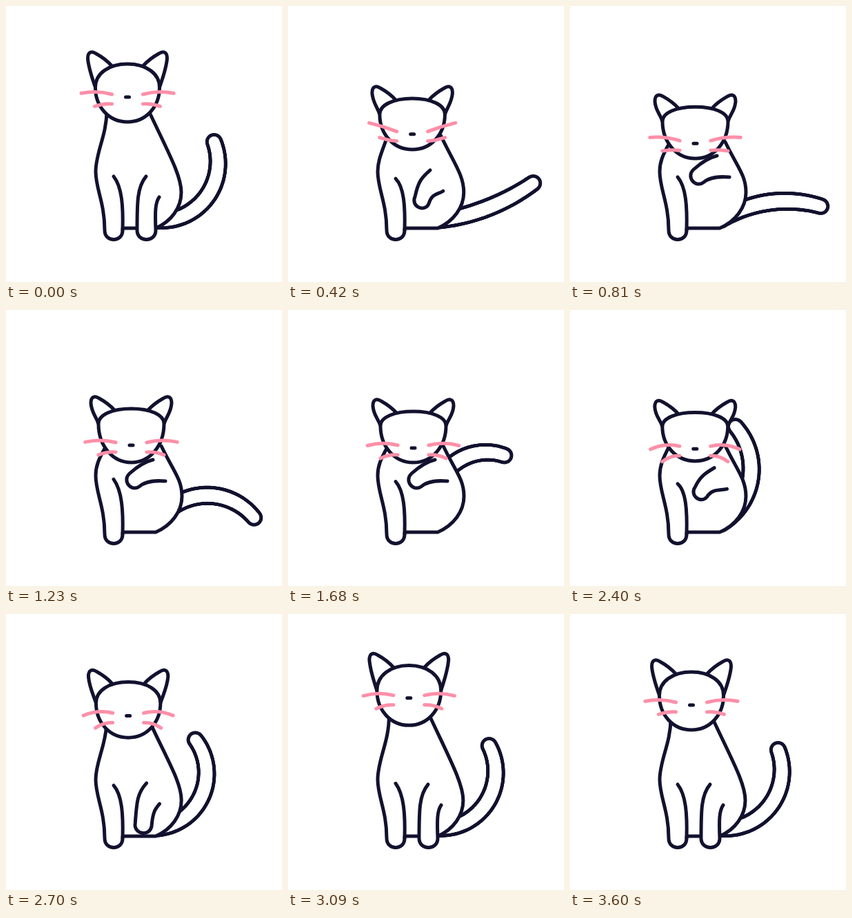
An HTML page with a canvas for the animation above (9630 ms loop, 400 px wide and 400 px high).

```html
<!DOCTYPE html>
<html lang="en">
<head>
<meta charset="utf-8">
<title>Cat washing its paw</title>
<style>
html, body { margin: 0; width: 100%; height: 100%; overflow: hidden; background: #fff; }
canvas { display: block; }
</style>
</head>
<body>
<canvas id="stage" width="400" height="400"></canvas>
<script>
const LOOP = 9630, STEP = 30;
const INK = '#12122f', PINK = '#ff8fa8', WHITE = '#fff';
const ctx = document.getElementById('stage').getContext('2d');
ctx.lineCap = ctx.lineJoin = 'round';

// The whole pose follows from these channels, keyed as [ms, value].
const channels = {
  crouch: [[0, 0], [420, 0.755], [700, 1], [1680, 1], [2400, 0.96], [2700, 0.21], [2970, -0.14], [3600, 0]],
  nod: [[0, 0], [420, 4], [1230, -2], [1680, 2], [2400, 6], [2970, -2], [3600, 0]],
  droop: [[0, 0], [420, -11], [1000, 0], [1680, 2], [2400, 6], [3600, 0]],
  lift: [[0, 0], [420, 0.55], [800, 1], [2000, 1], [2400, 0.78], [2700, 0.25], [3000, 0]],
  tailAngle: [[0, -53.5], [420, -21.4], [1100, -4], [1230, -4], [1680, -46], [2400, -81], [2700, -66], [3600, -53.5]],
  tailTurn: [[0, -115], [420, -28], [1230, 110], [1680, 132], [2400, -100], [2700, -122], [3600, -115]]
};

// Smooth interpolation that never overshoots a key.
function sample(keys, t) {
  const last = keys.length - 1;
  if (t >= keys[last][0]) return keys[last][1];
  const i = keys.findIndex((key, n) => t < keys[n + 1][0]);
  const slope = n => (keys[n + 1][1] - keys[n][1]) / (keys[n + 1][0] - keys[n][0]);
  const tangent = n => {
    if (n === 0 || n === last) return 0;
    const a = slope(n - 1), b = slope(n);
    return a * b > 0 ? 2 * a * b / (a + b) : 0;
  };
  const [[t0, a], [t1, b]] = keys.slice(i, i + 2);
  const span = t1 - t0, u = (t - t0) / span, v = 1 - u;
  return a * v * v * (1 + 2 * u) + b * u * u * (3 - 2 * u) +
    span * u * v * (v * tangent(i) - u * tangent(i + 1));
}

function curve(p) {
  ctx.beginPath();
  ctx.moveTo(p[0], p[1]);
  for (let i = 2; i < p.length; i += 6) ctx.bezierCurveTo(...p.slice(i, i + 6));
}

function stroke(color = INK) {
  ctx.strokeStyle = color;
  ctx.lineWidth = 5;
  ctx.stroke();
}

function shape(p) {
  curve(p);
  ctx.fillStyle = WHITE;
  ctx.fill();
  stroke();
}

// A circular arc that stretches as it curls, a little thicker in the middle.
function drawTail({ tailAngle, tailTurn }) {
  const angle = tailAngle * Math.PI / 180, turn = tailTurn * Math.PI / 180;
  const dots = 100, stride = (149 + 5 * turn * turn) / dots;
  for (const [color, inset] of [[INK, 0], [WHITE, 5]]) {
    let x = 217, y = 311;
    ctx.fillStyle = color;
    for (let i = 0; i < dots; i++) {
      const s = (i + 0.5) / dots, heading = angle + turn * (s - 0.5);
      x += stride * Math.cos(heading);
      y += stride * Math.sin(heading);
      ctx.beginPath();
      ctx.arc(x, y, 12.7 + 1.3 * Math.sin(Math.PI * s) - inset, 0, 2 * Math.PI);
      ctx.fill();
    }
  }
}

function drawBody({ crouch, nod }, chin) {
  const lx = 146 - 2 * crouch, ly = chin - 16 - 6 * crouch;
  const rx = 206 + 19 * crouch, ry = ly - 2;
  const belly = 254 + crouch;
  shape([
    lx, ly,
    lx + (152 - ly) * 0.2, ly + (240 - ly) * 0.4, 130, 212 + (ly - 152) * 0.3, 130, 240,
    130, 265, 143, 285, 143, 325,
    143, 343, 169, 343, 169, 325,
    169, 322, 169, 322, 170, 322,
    185, 322, 202, 322, 217, 322,
    240, 312, belly, 292, belly, 270,
    belly, 245, rx + (belly - rx) * 0.58, (ry + 270) / 2, rx, ry
  ]);
  curve([169, 325, 170, 290, 168, 262, 156, 247 + nod * 0.8]);
  stroke();
}

const pawDown = [
  [203, 247], [190, 262], [190, 285], [190, 325], [190, 343],
  [217, 343], [217, 325], [216, 300], [216, 285], [222, 277]
];
const pawUp = [
  [213, 217], [200, 220], [188, 229], [179, 237], [168, 247],
  [181, 264], [193, 256], [203, 247], [218, 247], [231, 248]
];

// The toes lead and the shoulder follows.
function drawPaw({ lift }) {
  shape(pawDown.flatMap((point, i) => {
    const k = i < 2 || i > 7 ? lift * lift : lift;
    return point.map((a, axis) => a + (pawUp[i][axis] - a) * k);
  }));
}

function drawHead({ crouch, nod, droop }, chin) {
  const cx = 176 + 5.5 * crouch, hw = 46.5 + crouch;
  const top = 84 + 61 * crouch + nod;
  const side = top + (chin - top) * (0.405 - 0.125 * crouch);
  const nose = chin - 36 + 13 * crouch + nod;
  const rise = side - (side - top) * 0.6, fall = side + (chin - side) * 0.56;

  for (const s of [-1, 1]) {
    const x = d => cx + s * (hw + d);
    shape([
      x(0), side,
      x(4), side - 12, x(10), top + 6, x(11), top - 8,
      x(11), top - 18, x(5), top - 19, x(-1), top - 15,
      x(-10), top - 10, x(-17), top - 5, x(-24), top + 3
    ]);
  }

  const l = cx - hw, r = cx + hw, k = hw * 0.58;
  shape([
    cx, top,
    cx + k, top, r, rise, r, side,
    r, fall, cx + k, chin, cx, chin,
    cx - k, chin, l, fall, l, side,
    l, rise, cx - k, top, cx, top
  ]);
  curve([cx - 2.5, nose, cx - 1, nose, cx + 1, nose, cx + 2.5, nose]);
  stroke();

  const whisker = (s, length, inner, bend, outer) => {
    ctx.beginPath();
    ctx.moveTo(cx + s * 22.5, nose + inner);
    ctx.quadraticCurveTo(cx + s * (length + 22) / 2, nose + bend, cx + s * length, nose + outer);
    stroke(PINK);
  };
  for (const s of [-1, 1]) {
    whisker(s, 67 - Math.abs(droop) * 0.4, -4, -10 + droop * 0.15, -5.5 + droop);
    whisker(s, 47.5, 10, 9, 13.5 + droop * 0.8);
  }
}

function draw(time) {
  const t = Math.floor(time % LOOP / STEP) * STEP;
  const pose = {};
  for (const name in channels) pose[name] = sample(channels[name], t);
  const chin = 168 + 53 * pose.crouch;

  ctx.fillStyle = WHITE;
  ctx.fillRect(0, 0, 400, 400);
  drawTail(pose);
  drawBody(pose, chin);
  drawPaw(pose);
  drawHead(pose, chin);
}

let start;
function tick(now) {
  start ??= now;
  draw(now - start);
  requestAnimationFrame(tick);
}
draw(0);
requestAnimationFrame(tick);
</script>
</body>
</html>
```
